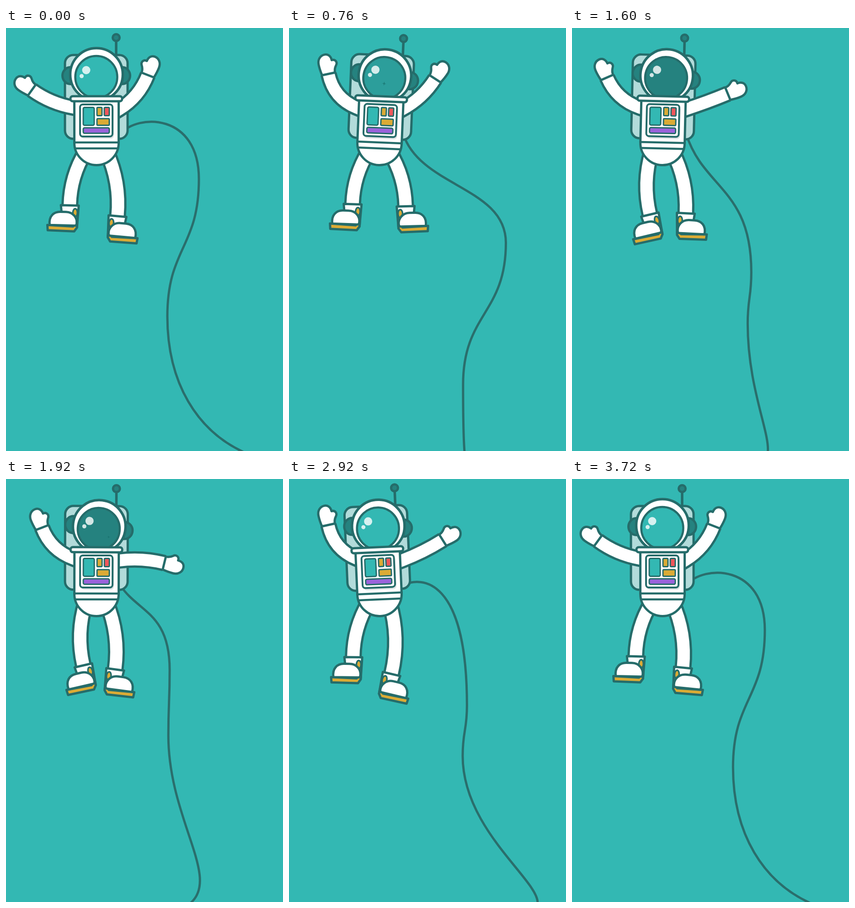
An HTML page with a canvas for the animation above (3.76 s loop, 606 px wide and 924 px high).

```html
<!DOCTYPE html>
<html lang="en">
<head>
<meta charset="utf-8">
<title>Floating astronaut</title>
<style>
  html, body { margin: 0; width: 100%; height: 100%; overflow: hidden; background: #33b8b3; }
  canvas { display: block; }
</style>
</head>
<body>
<canvas id="stage" width="606" height="924"></canvas>
<script>
const ctx = document.getElementById('stage').getContext('2d');
const LOOP = 3760;
const INK = '#256c6a', SKY = '#33b8b3', DEEP = '#25827f', PACK = '#b2dbda';
const GOLD = '#dbab35', RED = '#f0565a', PURPLE = '#9b63db', WHITE = '#fff';
const rad = degrees => degrees * Math.PI / 180;
const wrap = ms => (ms + LOOP) % LOOP;

// Eases back and forth between turning points, given as { time: value }
function swing(turns) {
  const keys = Object.entries(turns).map(([ms, value]) => [+ms, value]);
  return t => {
    const i = keys.findLastIndex(k => k[0] <= t);
    const [t0, a] = keys.at(i), [t1, b] = keys[(i + 1) % keys.length];
    return a + (b - a) * (1 - Math.cos(Math.PI * wrap(t - t0) / wrap(t1 - t0))) / 2;
  };
}

const motion = {
  tilt: swing({ 0: 0, 1080: 3, 2060: 0, 2900: -2.5 }),
  nod: swing({ 0: 0, 760: 6.5, 2500: 6.5, 3600: 0 }),
  shade: swing({ 300: 0, 1250: 1, 1950: 1, 2880: 0 }),
  leftRaise: swing({ 150: -3, 1280: 47, 1740: 10, 2160: 34, 2640: 9, 2920: 25, 3560: -1 }),
  rightRaise: swing({ 0: 25, 1160: 15, 2200: -37, 3450: 25 }),
  leftStretch: swing({ 760: 0, 1720: 1, 2860: .08 }),
  rightStretch: swing({ 1000: 0, 2640: 1 }),
  sag: swing({ 0: 186, 1200: 415, 2000: 288, 3400: 186 }),
  crestX: swing({ 0: 422, 1040: 485, 1900: 358, 2800: 388 }),
  crestY: swing({ 0: 330, 1400: 575, 2000: 410, 2900: 495, 3700: 330 }),
  troughX: swing({ 0: 353, 1300: 397, 2300: 336, 2900: 380, 3700: 352 }),
  troughY: swing({ 0: 630, 1100: 820, 1920: 560, 2400: 680, 2920: 605 }),
  belly: swing({ 1400: 0, 1920: 95, 2400: 0, 2920: 100, 3400: 0 }),
  exitX: swing({ 0: 519, 760: 384, 1280: 443, 2100: 399, 3330: 592 }),
};

// visor sparkles: time, x, y, size
const sparkles = [
  [760, 199, 119, 4.5], [1280, 162, 119, 3.5], [1920, 221, 122, 3],
  [2400, 199, 86, 8], [2400, 173, 120, 5.5]];

function paint(path, fill, width = 5, ink = INK) {
  const p = typeof path === 'string' ? new Path2D(path) : path;
  if (fill) { ctx.fillStyle = fill; ctx.fill(p); }
  if (width) { ctx.strokeStyle = ink; ctx.lineWidth = width; ctx.stroke(p); }
}

function box(x, y, w, h, r, fill, width) {
  const p = new Path2D();
  p.roundRect(x, y, w, h, r);
  paint(p, fill, width);
}

function oval(x, y, rx, ry, fill, width) {
  const p = new Path2D();
  p.ellipse(x, y, rx, ry, 0, 0, 7);
  paint(p, fill, width);
}

function turned(x, y, degrees, draw) {
  ctx.save();
  ctx.translate(x, y);
  ctx.rotate(rad(degrees));
  draw();
  ctx.restore();
}

const around = (x, y, degrees, draw) =>
  turned(x, y, degrees, () => { ctx.translate(-x, -y); draw(); });

// A curved tube; its end is drawn in a frame that follows the curve. Side -1 mirrors it.
function limb(x, y, side, angle, length, curl, width, drawEnd) {
  const rise = Math.tan(rad(curl));
  const path = new Path2D(
    `M-14 ${14 * rise}L0 0Q${length / 2} ${-length / 2 * rise} ${length} 0`);
  ctx.save();
  ctx.translate(x, y);
  ctx.scale(side, 1);
  ctx.rotate(rad(angle));
  paint(path, null, width);
  paint(path, null, width - 10, WHITE);
  turned(length, 0, curl, drawEnd);
  ctx.restore();
}

function drawHand() {
  paint('M0-14.5C8-16 14-17 24-17C36-17 43-9 43 0C43 8 37 13 28 13' +
    'C29 21 21 25 15 20C10 16 6 14.5 0 14.5Z', WHITE);
}

function drawFoot() {
  ctx.rotate(-Math.PI / 2);
  paint('M-19.5 1H19.5L17 46H-14Z', WHITE);
  oval(12, 17, 5, 9, GOLD, 3.5);
  paint('M-48 45L8 47L17 38V49L11 57.5L-47 56.5Z', GOLD);
  paint('M-43 45C-46 26-35 15.5-20 15.5H-8C8 15.5 17 28 16 40Q16 45 12 45Z', WHITE);
}

function arm(x, y, side, raise, rest) {
  const curl = rest + .55 * raise;
  limb(x, y, side, raise - 155, 100 * (1 - rad(curl) ** 2 / 6), curl, 36, drawHand);
}

function leg(x, side, stretch, reach) {
  limb(x, 270, side, 107 - 16 * stretch, 119 + reach * stretch ** .6, -15, 37, drawFoot);
}

function drawTether(t) {
  const { sag, crestX, crestY, troughX, troughY, belly, exitX } =
    Object.fromEntries(Object.entries(motion).map(([name, at]) => [name, at(t)]));
  const middle = (crestY + troughY) / 2, drop = 924 - troughY;
  const p = new Path2D();
  p.moveTo(250, 232);
  p.bezierCurveTo(288, sag, crestX, sag, crestX, crestY);
  p.bezierCurveTo(crestX, middle, troughX, middle, troughX, troughY);
  p.bezierCurveTo(troughX, troughY + drop / 2,
    troughX + .4 * (exitX - troughX) + belly, 924 - drop * .15, exitX, 926);
  paint(p, null, 5, '#2a6e6c');
}

function drawSparkle(t, [peak, x, y, size]) {
  const r = size * Math.cos(Math.min(1, Math.abs(t - peak) / 300) * Math.PI / 2);
  if (r < .1) return;
  const p = new Path2D();
  for (let i = 0; i < 8; i++) {
    const d = i % 2 ? r * .3 : r, a = i * Math.PI / 4;
    p.lineTo(x + d * Math.cos(a), y + d * Math.sin(a));
  }
  paint(p, 'rgba(22,108,104,.75)', 0);
}

function drawVisor(t) {
  oval(198, 101.5, 57.5, 57.5, WHITE, 5.5);
  oval(197.5, 107, 46, 46, SKY, 0);
  ctx.globalAlpha = motion.shade(t);
  oval(197.5, 107, 46, 46, DEEP, 0);
  ctx.globalAlpha = 1;
  sparkles.forEach(s => drawSparkle(t, s));
  oval(197.5, 107, 46, 46, null, 4.5);
  oval(175.5, 92, 9, 9, 'rgba(255,255,255,.8)', 0);
  oval(165.5, 105, 4.5, 4.5, 'rgba(255,255,255,.8)', 0);
}

function drawPack() {
  paint('M241 28V62', null, 5.5);
  oval(241, 21, 7.5, 7.5, DEEP, 5);
  box(129, 59, 137, 183, 18, PACK);
}

function drawEars() {
  for (const x of [141, 254]) oval(x, 104, 17.5, 18.5, DEEP);
}

function drawTorso() {
  paint('M149.5 156V251A48.5 48.5 0 0 0 246.5 251V156Z', WHITE);
  paint('M149.5 250H246.5M151 263H245', null, 4.5);
  box(164, 171, 72, 71, 7, '#dfe5e6', 0);
  box(162, 167, 71, 70, 6, WHITE, 4);
  box(169, 173.5, 24, 39, 3, SKY, 3);
  box(199, 173.5, 11, 18, 2, GOLD, 3);
  box(215, 173.5, 11, 18, 2, RED, 3);
  box(199, 198, 27, 14.5, 2, GOLD, 3);
  box(169, 218, 57, 12, 3, PURPLE, 3);
  box(141, 149, 113, 11, 5, WHITE, 5);
}

function draw(t) {
  const withBody = part => around(197, 252, motion.tilt(t), part);
  const withHead = part => withBody(() => around(182, 152, motion.nod(t), part));
  ctx.fillStyle = SKY;
  ctx.fillRect(0, 0, 606, 924);
  drawTether(t);
  withBody(drawPack);
  withHead(drawEars);
  arm(148, 174, 1, motion.leftRaise(t), 14);
  arm(247, 178, -1, motion.rightRaise(t), 5);
  leg(174, 1, motion.leftStretch(t), 18);
  leg(220, -1, motion.rightStretch(t), 37);
  withHead(() => drawVisor(t));
  withBody(drawTorso);
}

ctx.lineJoin = 'round';
const start = performance.now();
function frame() {
  draw((performance.now() - start) % LOOP);
  requestAnimationFrame(frame);
}
frame();
</script>
</body>
</html>
```
